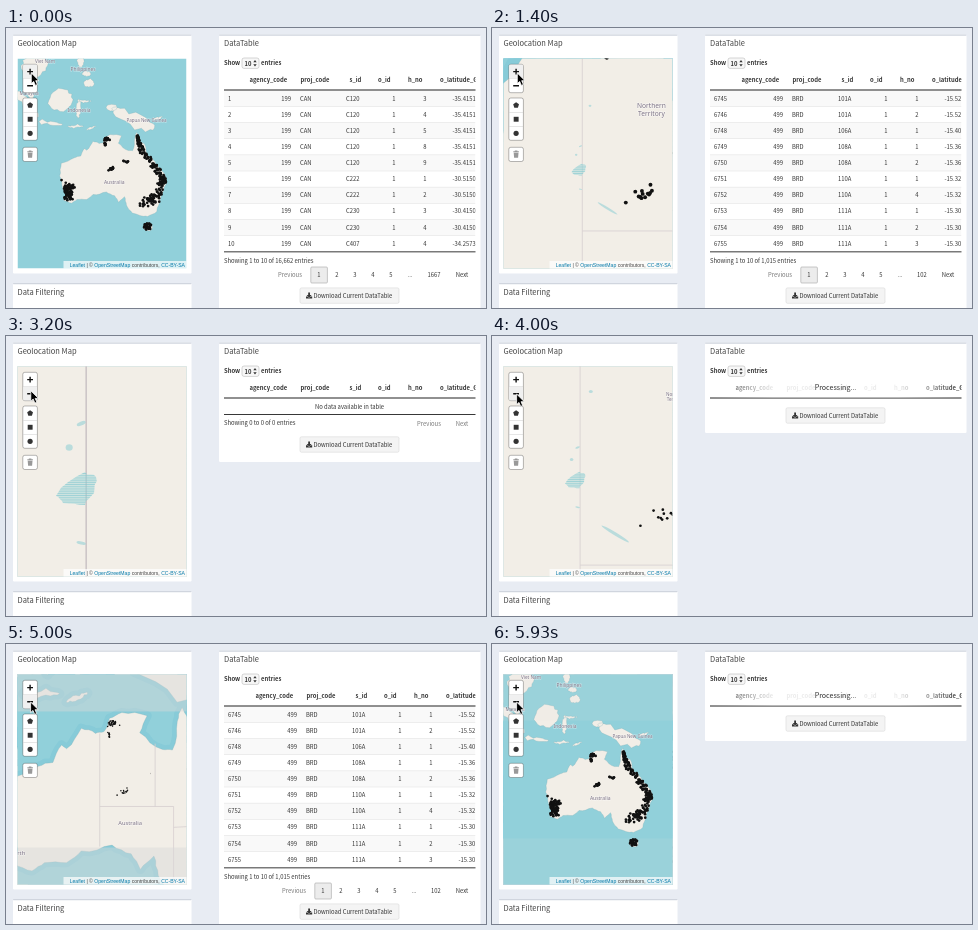
Recreate the animation shown at these times as an HTML page with a canvas. Size 480x280 px, loop 5.99 s.

```html
<!DOCTYPE html>
<html lang="en">
<head>
<meta charset="utf-8">
<title>Map and table</title>
<style>
html, body { margin: 0; width: 100%; height: 100%; overflow: hidden; background: #e8ecf3; }
canvas, svg { position: absolute; left: 0; top: 0; width: 480px; height: 280px; }
text { font-family: "Noto Sans CJK JP", "Noto Sans CJK SC", "Noto Sans CJK", Lato, sans-serif; font-size: 5.88px; fill: #333; white-space: pre; }
.title { font-size: 7.5px; fill: #444; }
.bold { font-weight: 700; }
.busy { font-size: 7.1px; }
.small { font-family: "Liberation Sans", Arial, sans-serif; font-size: 5.1px; }
.place { font-family: "Noto Sans", sans-serif; fill: #796f82; stroke: #fff; stroke-opacity: .6; stroke-width: .8px; paint-order: stroke; text-anchor: middle; }
</style>
</head>
<body>
<svg id="back" viewBox="0 0 480 280"></svg>
<canvas id="map"></canvas>
<svg id="ui" viewBox="0 0 480 280">
  <defs>
    <clipPath id="mapClip"><rect x="11.5" y="30.5" width="169" height="210"/></clipPath>
    <clipPath id="tableClip"><rect x="218" y="40" width="251.5" height="186"/></clipPath>
    <linearGradient id="veil">
      <stop offset="0" stop-color="#fff" stop-opacity="0"/>
      <stop offset=".25" stop-color="#fff" stop-opacity=".9"/>
      <stop offset=".75" stop-color="#fff" stop-opacity=".9"/>
      <stop offset="1" stop-color="#fff" stop-opacity="0"/>
    </linearGradient>
  </defs>
</svg>
<script>
const LOOP = 5990, STEP = 200 / 3, ZOOM_TIME = 250;
const CX = 96, CY = 135.5, PX_PER_DEG = 2.67;
const MAP = { x: 11.5, y: 30.5, w: 169, h: 210 };
const back = document.getElementById('back');
const ui = document.getElementById('ui');
const clamp = v => Math.min(1, Math.max(0, v));

function el(name, attrs, parent, text) {
  const node = document.createElementNS('http://www.w3.org/2000/svg', name);
  for (const key in attrs) node.setAttribute(key, attrs[key]);
  if (text !== undefined) node.textContent = text;
  parent.appendChild(node);
  return node;
}
// y is the middle of the line of text
const label = (parent, x, y, text, cls = '', anchor = 'start') =>
  el('text', { x, y: y + 2.3, class: cls, 'text-anchor': anchor }, parent, text);
const box = (parent, x, y, width, height, fill, more = {}) =>
  el('rect', { x, y, width, height, fill, ...more }, parent);
const show = (node, on) => { node.style.display = on ? '' : 'none'; };

// ---- geography: longitude, latitude (south positive) ----
let seed = 11;
const random = () => (seed = (seed * 16807) % 2147483647) / 2147483647;
const bell = () => (random() + random() + random() - 1.5) * 1.5;

const rad = Math.PI / 180;
const mercator = lat => Math.log(Math.tan(Math.PI / 4 + lat * rad / 2)) / rad;
const project = ([lon, lat]) => [(lon - 129.37) * PX_PER_DEG, (mercator(lat) - 22.56) * PX_PER_DEG];

// breaks each side of a shape at a shifted midpoint
function rough(points, amount) {
  return points.flatMap(([x, y], i) => {
    const [x2, y2] = points[(i + 1) % points.length];
    const k = (random() - .5) * amount;
    return [[x, y], [(x + x2) / 2 - (y2 - y) * k, (y + y2) / 2 + (x2 - x) * k]];
  });
}
function trace(path, points, close = true) {
  points.forEach(([x, y], i) => i ? path.lineTo(x, y) : path.moveTo(x, y));
  if (close) path.closePath();
}
function blob(lon, lat, w, h, tilt = 0) {
  const [cx, cy] = project([lon, lat]), c = Math.cos(tilt), s = Math.sin(tilt);
  return Array.from({ length: 12 }, (_, i) => {
    const x = w * Math.cos(i * Math.PI / 6), y = h * Math.sin(i * Math.PI / 6);
    return [cx + (x * c - y * s) * PX_PER_DEG, cy + (x * s + y * c) * PX_PER_DEG];
  });
}

const australia = [[142.4,10.8], [143.7,14.2], [145.3,15.1], [146.2,18.7], [149.3,21.4], [150.8,23.4], [153.1,26],
  [153.5,28.8], [151.3,33.6], [149.9,37.5], [146.4,39], [143.5,38.7], [140.7,38], [138.5,35.6], [137.8,33],
  [135.6,34.8], [134.1,32.7], [131,31.5], [126,32.3], [123.6,33.9], [120,33.9], [118,35], [115,34.2], [115.7,32],
  [113.5,26.3], [114.1,21.9], [119,20], [121.4,19.4], [122.8,16.7], [123.6,17.3], [126,14.1], [128.3,14.9],
  [129.7,14.6], [130.6,12.5], [132.6,11.6], [136.7,12.1], [135.5,14.8], [139.2,17.4], [140.8,17.5], [141.6,13]];
// centre, half sizes in degrees, tilt
const islands = [[141,5.6,8.8,2.5,.42], [133,1.6,2.1,1.2], [114,-1.2,4.7,4.1,-.5], [101,.2,6.8,1.6,.82],
  [110,7.4,4.6,.7,.14], [120.6,2,.9,3.6], [123,-.8,2.4,.4], [124.5,-7.5,2,1.5], [121.4,-15.4,1.3,2],
  [123.5,-11,1.7,1], [104,-14,5,4], [102,-4.5,1.1,3.2,-.4], [125.3,9.2,1.9,.4,-.4], [119.5,8.6,3,.4],
  [150.3,5.6,1.9,.5,-.3], [146.6,42,1.8,1.5]];

const land = new Path2D();
trace(land, rough(rough(australia.map(project), .16), .2));
islands.forEach(i => trace(land, rough(blob(...i), .7)));

const borders = new Path2D();
[[[129,14.9], [129,31.7]], [[129,26], [141,26], [141,38]], [[138,16.5], [138,26]], [[141,29], [153,28.5]]]
  .forEach(line => trace(borders, line.map(project), false));

const lake = new Path2D();
trace(lake, rough(rough([[50,160], [79,136], [90,141], [88,157], [79,169], [57,167]], .2), .5)
  .map(([x, y]) => [(x - CX) / 16, (y - CY) / 16]));
// position, radii, tilt around the map centre
const ponds = [[-1.3,-3,.3,.12,-.4], [-2.05,-1.5,.22,.2,0], [-1.3,4.47,.3,.1,.2], [3.4,7.8,2,.2,.55], [.35,-10,.25,.2,0]];

// ---- map canvas ----
const canvas = document.getElementById('map');
const dpr = window.devicePixelRatio || 1;
canvas.width = 480 * dpr;
canvas.height = 280 * dpr;
const ctx = canvas.getContext('2d');

const dots = [];
function scatter(count, pick) {
  for (let tries = count * 6; count > 0 && tries > 0; tries--) {
    const [x, y] = pick();
    if (!ctx.isPointInPath(land, x - CX, y - CY)) continue;
    dots.push([x - CX, y - CY]);
    count--;
  }
}
const around = (x, y, sx, sy) => () => [x + bell() * sx, y + bell() * sy];
scatter(95, around(62, 163, 3.6, 5.5));
scatter(35, around(100.9, 111.2, 1.6, .9));
scatter(10, around(99, 116.3, .5, .8));
scatter(13, around(105.5, 140.8, 1.8, 1.1));
scatter(6, around(119.8, 133.7, 2, .8));
scatter(30, around(142, 197, 4, 3.5));
// a trail down the east that widens southward
const trail = [[131,107], [136,123], [149,139], [158,152], [152,167], [139,176]];
scatter(210, () => {
  const u = random() * (trail.length - 1), i = Math.floor(u), f = u - i;
  const [a, b] = [trail[i], trail[i + 1]], spread = 1 + u * .7;
  return [a[0] + (b[0] - a[0]) * f + bell() * spread, a[1] + (b[1] - a[1]) * f + bell() * spread];
});

function drawMap({ s, level, dim, axis, target, stretch }) {
  const toMap = () => ctx.setTransform(dpr * s, 0, 0, dpr * s, CX * dpr, CY * dpr);
  const toStage = () => ctx.setTransform(dpr, 0, 0, dpr, 0, 0);
  toStage();
  ctx.save();
  ctx.beginPath();
  ctx.rect(MAP.x, MAP.y, MAP.w, MAP.h);
  ctx.clip();
  ctx.fillStyle = '#91d0da';
  ctx.fillRect(MAP.x, MAP.y, MAP.w, MAP.h);
  toMap();
  ctx.lineJoin = 'round';
  if (level > 0) {
    ctx.strokeStyle = 'rgba(95,180,205,.2)';
    ctx.lineWidth = 4;
    ctx.stroke(land);
  }
  ctx.fillStyle = '#f2eee7';
  ctx.fill(land);
  ctx.lineWidth = .6 / s;
  ctx.strokeStyle = 'rgba(120,170,175,.45)';
  ctx.stroke(land);

  if (level > 0) {
    ctx.strokeStyle = level > 3 ? '#cdc6c8' : '#d6cfd0';
    ctx.lineWidth = (level > 3 ? 1.6 : .8) / s;
    ctx.stroke(borders);
  }
  if (level > 1) {
    ctx.fillStyle = 'rgba(150,208,214,.6)';
    for (const [x, y, rx, ry, tilt] of ponds) {
      ctx.beginPath();
      ctx.ellipse(x, y, rx, ry, tilt, 0, 7);
      ctx.fill();
    }
    ctx.fillStyle = 'rgba(160,212,216,.45)';
    ctx.fill(lake);
    ctx.save();
    ctx.clip(lake);
    ctx.fillStyle = 'rgba(130,200,208,.65)';
    for (let y = -1; y < 3; y += 2.2 / s) ctx.fillRect(-4, y, 5, .9 / s);
    ctx.restore();
  }
  toStage();
  // tiles still loading beyond the ones already shown
  if (dim > 0) {
    const half = 59 * s / target;
    ctx.fillStyle = `rgba(216,216,216,${dim})`;
    if (axis === 'x') {
      ctx.fillRect(0, 0, CX - half, 280);
      ctx.fillRect(CX + half, 0, 200, 280);
    } else {
      ctx.fillRect(0, 0, 200, CY - half);
      ctx.fillRect(0, CY + half, 200, 200);
    }
  }
  // during a zoom the dot layer is scaled as one picture
  ctx.beginPath();
  ctx.rect(CX - MAP.w / 2 * stretch, CY - MAP.h / 2 * stretch, MAP.w * stretch, MAP.h * stretch);
  ctx.clip();
  ctx.fillStyle = '#111';
  for (const [x, y] of dots) {
    ctx.beginPath();
    ctx.arc(CX + x * s, CY + y * s, 1.35 * stretch, 0, 7);
    ctx.fill();
  }
  ctx.restore();
}

// ---- panels and controls ----
function panel(x, y, w, h) {
  const body = box(back, x, y, w, h, '#fff', { rx: 1.2 });
  box(back, x, y, w, 1.2, '#d0d5de', { rx: .6 });
  return body;
}
panel(7, 6.5, 178.5, 239);
panel(7, 255, 178.5, 40);
const tablePanel = panel(213, 6.5, 261.5, 300);
label(back, 11.5, 16, 'Geolocation Map', 'title');
label(back, 11.5, 265, 'Data Filtering', 'title');
label(back, 218, 16, 'DataTable', 'title');
label(back, 218, 35, 'Show', 'bold');
box(back, 236, 30, 17, 10.4, '#f7f7f7', { rx: 2, stroke: '#bbb', 'stroke-width': .6 });
label(back, 238.5, 35.2, '10', 'bold');
el('path', { d: 'M247.3 34.2l1.7-2.2 1.7 2.2zM247.3 36.2l1.7 2.2 1.7-2.2z', fill: '#333' }, back);
label(back, 255, 35, 'entries', 'bold');

// text lines, offset from the centre, first and last zoom level, size
const places = [['Viet Nam',-57,-102,0,0,4.7], ['Philippines',-19,-94.5,0,0,4.9], ['Malaysia',-73,-70,0,0,4.7],
  ['Indonesia',-23,-53,0,0,4.9], ['Papua New Guinea',44.5,-43,0,0,4.5], ['Australia',12.2,19,0,1,5],
  ['Perth',-36.5,32,1,1,5], ['Northern/Territory',11,-9.3,2,3,4.6]];
const placeLayer = el('g', { 'clip-path': 'url(#mapClip)' }, ui);
const placeNodes = places.map(([text, , , , , size]) => {
  const g = el('g', {}, placeLayer), lines = text.split('/');
  lines.forEach((line, i) => {
    const y = (i - (lines.length - 1) / 2) * 1.2 * size + size * .33;
    el('text', { class: 'place', y, style: `font-size:${size}px` }, g, line);
  });
  return g;
});
function drawPlaces({ s, level }) {
  places.forEach(([, x, y, from, to], i) => {
    show(placeNodes[i], level >= from && level <= to);
    placeNodes[i].setAttribute('transform', `translate(${CX + x * s} ${CY + y * s}) scale(${s / 2 ** level})`);
  });
}

box(ui, 57.5, 233, 123, 7.5, '#fff', { opacity: .7 });
const credit = label(ui, 179, 236.6, '', 'small', 'end');
[['Leaflet', 1], [' | © '], ['OpenStreetMap', 1], [' contributors, '], ['CC-BY-SA', 1]].forEach(([text, link]) =>
  el('tspan', { style: 'fill:' + (link ? '#0078a8' : '#444') }, credit, text));

const bar = (y, h) => box(ui, 16.8, y, 14.6, h, '#fff', { rx: 2, stroke: '#000', 'stroke-opacity': .28, 'stroke-width': 1 });
const rule = y => box(ui, 17.2, y, 13.8, .5, '#ccc');
bar(36.3, 28.4); rule(50.3);
bar(70, 42.3); rule(84); rule(98);
bar(119.3, 14.2);
const hover = box(ui, 17.3, 36.8, 13.6, 13.3, '#f0f0f0');
el('path', { d: 'M21.2 43.6h5.8M24.1 40.7v5.8M21.2 57.7h5.8', stroke: '#111', 'stroke-width': 1.4 }, ui);
el('path', { d: 'M24.1 74.2l2.9 2.1-1.1 3.4h-3.6l-1.1-3.4z', fill: '#333' }, ui);
box(ui, 21.7, 88.8, 4.9, 4.9, '#333');
el('circle', { cx: 24.1, cy: 105.3, r: 2.6, fill: '#333' }, ui);
el('path', { d: 'M21.3 123.2h1.5v-.8h2.6v.8h1.5v1h-5.6zM21.7 124.7h4.8l-.4 5h-4z', fill: '#999' }, ui);

// ---- tables ----
const repeat = (...spec) => spec.flatMap(([value, n]) => Array(n).fill(value));
const run = (from, n) => Array.from({ length: n }, (_, i) => from + i);
const tables = [
  { shift: 0, total: '16,662', pages: '1667', ids: run(1, 10), code: '199', proj: repeat(['CAN', 10]),
    site: repeat(['C120', 5], ['C222', 2], ['C230', 2], ['C407', 1]), h: '3458912344',
    lat: repeat(['-35.4151', 5], ['-30.5150', 2], ['-30.4150', 2], ['-34.2573', 1]) },
  { shift: 0, total: '5,453', pages: '546', ids: [...run(1, 5), ...run(54, 5)], code: '199',
    proj: repeat(['CAN', 5], ['MUR', 5]),
    site: repeat(['C120', 5], ['C104', 2], ['C106', 3]), h: '3458919234',
    lat: repeat(['-35.4151', 5], ['-35.4984', 5]) },
  { shift: 6, total: '1,015', pages: '102', ids: [...run(6745, 2), ...run(6748, 8)], code: '499',
    proj: repeat(['BRD', 10]),
    site: repeat(['101A', 2], ['106A', 1], ['108A', 2], ['110A', 2], ['111A', 3]), h: '1211214123',
    lat: repeat(['-15.52', 2], ['-15.40', 1], ['-15.36', 2], ['-15.32', 2], ['-15.30', 3]) },
  { shift: 9, total: '16', ids: run(11840, 10), code: '799', proj: repeat(['AS1', 10]),
    site: repeat(['NT52', 3], ['NT53', 4], ['NT54', 1], ['NT55', 2]), h: '1231234323',
    lat: repeat(['-23.8', 7], ['-23.6', 1], ['-23.9', 2]) },
];

function header(g, shift) {
  const clip = el('g', { 'clip-path': 'url(#tableClip)' }, g);
  [['agency_code', 243.5], ['proj_code', 294.5], ['s_id', 343.5], ['o_id', 372], ['h_no', 402], ['o_latitude_GDA94', 434]]
    .forEach(([text, x]) => label(clip, x + shift, 52, text, 'bold'));
  box(g, 218, 61.5, 251.5, 1, '#222');
  return clip;
}
function button(g, y) {
  box(g, 294, y - 7.7, 99, 15.4, '#f4f4f4', { rx: 1.5, stroke: '#d8d8d8', 'stroke-width': .6 });
  el('path', { d: `M302.2 ${y - 3}h1.8v2.4h1.6l-2.5 2.7-2.5-2.7h1.6zM300 ${y + .8}h1.4l1.7 1.6 1.7-1.6h1.4v2.2h-6.2z`, fill: '#333' }, g);
  label(g, 307.5, y, 'Download Current DataTable');
}
function pager(g, y, pages, count) {
  const mid = (x, text, color = '#333') => { label(g, x, y, text, '', 'middle').style.fill = color; };
  const extra = pages ? pages.length - 3 : 0;
  const first = pages ? 317 - 4 * extra : 456 - 18 * count - 5;
  mid(count ? first - 29 : 423, 'Previous', '#777');
  mid(456, 'Next', count ? '#333' : '#777');
  if (count) box(g, first - 8.2, y - 8, 16.6, 16, '#ececec', { rx: 1, stroke: '#a5a5a5', 'stroke-width': .6 });
  for (let i = 0; i < count; i++) mid(first + i * 18, i + 1);
  if (pages) {
    mid(first + 91, '...');
    mid(first + 113 + extra * 2, pages);
  }
}
function buildTable(t) {
  const g = el('g', {}, ui), d = t.shift;
  const clip = header(g, d);
  t.ids.forEach((id, i) => {
    const y = 70.2 + i * 16.13;
    if (i % 2 === 0) box(clip, 218, y - 7.8, 251.5, 16.1, '#f9f9f9');
    if (i) box(clip, 218, y - 8.1, 251.5, .5, '#ddd');
    const cell = (x, text, anchor) => label(clip, x, y, text, '', anchor);
    cell(222, id);
    cell(285 + d, t.code, 'end');
    cell(294 + d, t.proj[i]);
    cell(340 + d, t.site[i]);
    cell(389.5 + d, '1', 'end');
    cell(420.5 + d, t.h[i], 'end');
    cell(446.5 + d, t.lat[i]);
  });
  box(g, 218, 223.4, 251.5, .9, '#222');
  label(g, 218, 232.5, `Showing 1 to 10 of ${t.total} entries`);
  pager(g, t.pages ? 247 : 233, t.pages, t.pages ? 5 : 2);
  const y = t.pages ? 267.6 : 254;
  button(g, y);
  return { g, bottom: y + 17.5 };
}
function buildEmpty() {
  const g = el('g', {}, ui);
  header(g, 0);
  label(g, 343.5, 70.2, 'No data available in table', '', 'middle');
  box(g, 218, 78, 251.5, .9, '#222');
  label(g, 218, 87, 'Showing 0 to 0 of 0 entries');
  pager(g, 87.5, '', 0);
  button(g, 108.5);
  return { g, bottom: 126 };
}
function buildBusy() {
  const g = el('g', {}, ui);
  header(g, 0);
  box(g, 218, 43, 251.5, 18.4, 'url(#veil)');
  label(g, 343.5, 52, 'Processing...', 'busy', 'middle');
  button(g, 79.5);
  return { g, bottom: 97 };
}
// one view per zoom level, then the waiting view
const views = [...tables.map(buildTable), buildEmpty(), buildBusy()];
const BUSY = views.length - 1;

const cursor = el('path', { d: 'M0 0v10.6l2.4-2.2 1.7 4 2-.9-1.7-3.8h3.3z', fill: '#000', stroke: '#fff', 'stroke-width': .8 }, ui);

// ---- motion ----
// zoom start, rows arrive, whether the waiting view shows just before;
// the clicks go one level in up to the deepest, then one level out
const clicks = [[40, 600, false], [788, 1266, false], [1355, 1733, true], [2015, 2466, true],
  [3615, 4066, true], [4280, 4800, true], [4868, 5400, false], [5545, LOOP, true]];
const levelAfter = n => 4 - Math.abs(4 - n);

// cubic-bezier(0, 0, .25, 1)
function ease(x) {
  if (x >= 1) return 1;
  let lo = 0, hi = 1;
  for (let i = 0; i < 24; i++) {
    const u = (lo + hi) / 2;
    .75 * u * u + .25 * u ** 3 < x ? lo = u : hi = u;
  }
  return 3 * lo * lo - 2 * lo ** 3;
}
function camera(ms) {
  const n = clicks.filter(c => c[0] <= ms).length;
  if (!n) return { s: 1, level: 0, dim: 0, stretch: 1 };
  const a = levelAfter(n - 1), b = levelAfter(n), age = ms - clicks[n - 1][0];
  const p = ease(age / ZOOM_TIME), target = 2 ** b;
  const s = 2 ** a + (target - 2 ** a) * p;
  return {
    s, target,
    level: p < 1 ? Math.min(a, b) : b,
    stretch: p < 1 ? s / 2 ** a : 1,
    dim: b < a && b < 3 ? .45 * clamp((410 - age) / 80) : 0,
    axis: b === 2 ? 'x' : 'y',
  };
}
function viewAt(ms) {
  const waiting = clicks.some(([, done, busy]) => busy && ms < done && ms >= done - STEP);
  return waiting ? BUSY : levelAfter(clicks.filter(c => c[1] <= ms).length);
}

let lastStep = -1;
function render(time) {
  const step = Math.min(89, Math.floor((time % LOOP) / STEP + .05));
  if (step === lastStep) return;
  lastStep = step;
  const ms = step * STEP + 1;
  const cam = camera(ms);
  drawMap(cam);
  drawPlaces(cam);

  const current = viewAt(ms);
  views.forEach((v, i) => show(v.g, i === current));
  tablePanel.setAttribute('height', views[current].bottom - 6.5);

  const q = clamp((ms - 2933) / 400), move = q * q * (3 - 2 * q);
  cursor.setAttribute('transform', `translate(${25.3 - .7 * move} ${45 + 13 * move})`);
  hover.setAttribute('y', move < .5 ? 36.8 : 50.9);
}
const t0 = performance.now();
function tick() {
  render(performance.now() - t0);
  requestAnimationFrame(tick);
}
tick();
</script>
</body>
</html>
```
